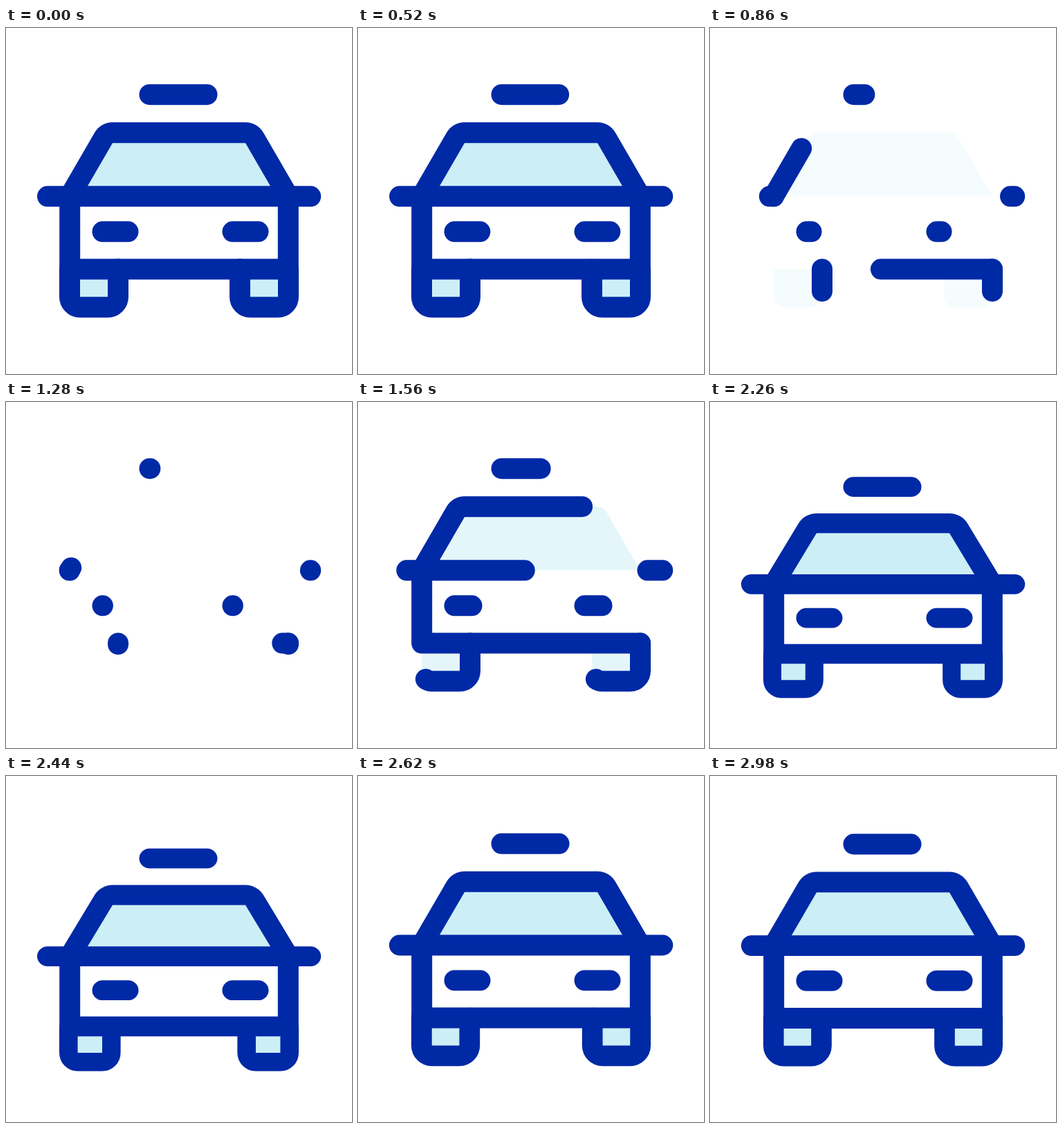
An HTML page that plays this animation: 500x500 px, repeating every 3 s.

```html
<!DOCTYPE html>
<html lang="en">
<head>
<meta charset="utf-8">
<title>Taxi</title>
<style>
  html, body { margin: 0; width: 100%; height: 100%; overflow: hidden; background: #fff; }
  svg { display: block; width: 100vw; height: 100vh; }
  .line { fill: none; stroke: #0029a6; stroke-width: 30; stroke-linecap: round; stroke-linejoin: round; }
  .tint { fill: #cceef6; }
</style>
</head>
<body>
<svg viewBox="0 0 500 500">
  <g class="wheel" data-x="77"></g>
  <g class="wheel" data-x="423"></g>
  <g id="car"></g>
</svg>
<script>
const LOOP = 3000, STEP = 20;
const GROUND = 418.6;

const leftWheel = "M162 348.4V388.6A15 15 0 0 1 147 403.6H107A15 15 0 0 1 92 388.6V348.4";
const rightWheel = "M408 348.4V388.6A15 15 0 0 1 393 403.6H353A15 15 0 0 1 338 388.6V348.4";
const roof = "M92 243.3L141 158.7A15 15 0 0 1 154 151.2H346A15 15 0 0 1 359 158.7L408 243.3";
const carLines = [
  roof,
  "M408 348.6H92.2V243.3H407.8V348.6",  // body, drawn from its lower right corner
  "M92 243.3H60",                       // mirrors
  "M408 243.3M440.2 243.3H408",
  "M207.5 96.2H290.5",                  // roof sign
  "M139.5 294.3H176.5",                 // headlights
  "M327.5 294.3H364.5"
];

const car = document.getElementById("car");
const wheels = [...document.querySelectorAll(".wheel")];
const lines = [], tints = [];

function addPath(parent, d, kind) {
  const path = document.createElementNS("http://www.w3.org/2000/svg", "path");
  path.setAttribute("d", d);
  path.setAttribute("class", kind);
  parent.append(path);
  if (kind === "tint") tints.push(path);
  else lines.push({ path, length: path.getTotalLength() });
}

[leftWheel, rightWheel].forEach((d, i) => {
  addPath(wheels[i], d, "tint");
  addPath(wheels[i], d, "line");
});
addPath(car, roof, "tint");
carLines.forEach(d => addPath(car, d, "line"));

// Smooth ease from 0 to 1 between two times
function ease(t, from, to) {
  const s = Math.min(1, Math.max(0, (t - from) / (to - from)));
  return s * s * (3 - 2 * s);
}

function trim({ path, length }, part) {
  path.style.display = part > 0 ? "" : "none";
  path.style.strokeDasharray = part < 1 ? `${part * length} ${length + 100}` : "none";
}

function draw(t) {
  const gone = 1 - ease(t, 500, 1000);
  const part = gone + ease(t, 1250, 1750);
  lines.forEach(line => trim(line, part));
  const alpha = gone + ease(t, 1370, 1750);
  tints.forEach(tint => { tint.style.opacity = alpha; });

  const sink = ease(t, 2000, 2333) - ease(t, 2333, 2667) + ease(t, 2923, 3256);
  car.setAttribute("transform", `translate(0 ${35 * sink}) scale(1 ${1 - 0.05 * sink})`);
  const size = 1 - 0.15 * sink;
  wheels.forEach(wheel => {
    const x = wheel.dataset.x;
    wheel.setAttribute("transform",
      `translate(${x} ${GROUND + 10.4 * sink}) scale(${size}) translate(${-x} ${-GROUND})`);
  });
}

const start = performance.now();
function tick() {
  const t = (performance.now() - start) % LOOP;
  draw(Math.floor(t / STEP) * STEP);
  requestAnimationFrame(tick);
}
tick();
</script>
</body>
</html>
```
